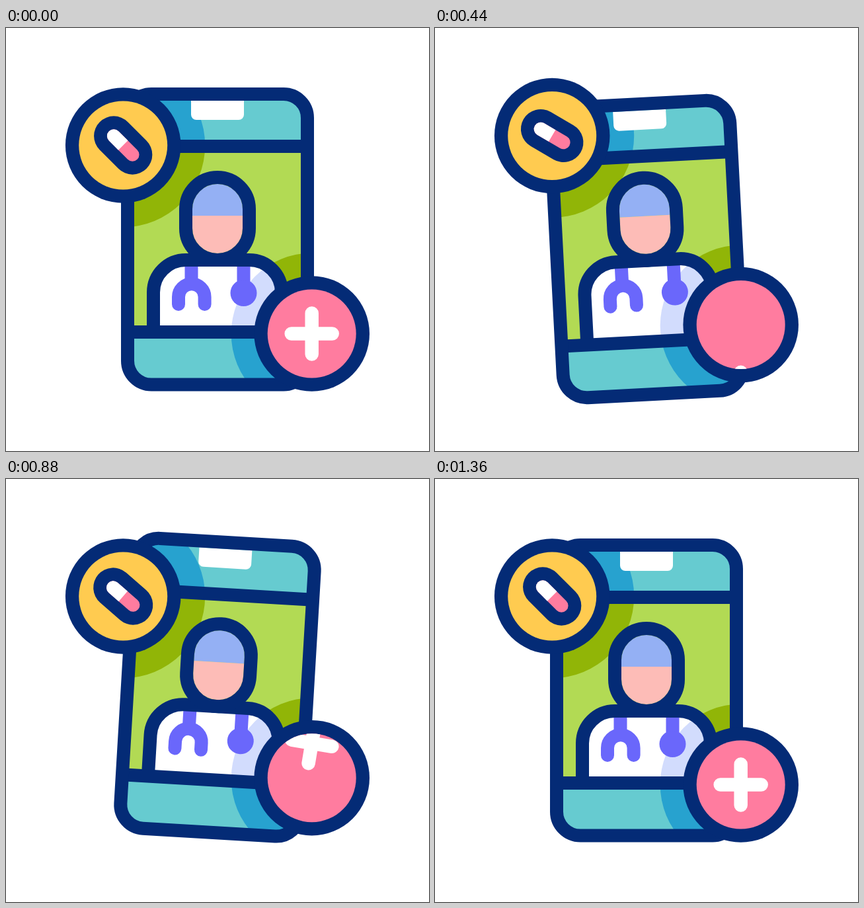
Write an HTML page with a canvas that moves like this. It is 640 px wide and 640 px high and loops after 1.68 s.

```html
<!DOCTYPE html>
<html lang="en">
<head>
<meta charset="utf-8">
<title>Online doctor</title>
<style>
  html, body { margin: 0; width: 100%; height: 100%; overflow: hidden; background: #fff; }
  canvas { display: block; width: 640px; height: 640px; }
</style>
</head>
<body>
<canvas id="stage" width="640" height="640"></canvas>
<script>
const ctx = document.getElementById('stage').getContext('2d');
const LOOP = 1680;
const NAVY = '#042b76', PINK = '#ff7c9f', WHITE = '#fff', VIOLET = '#6a67fb';
const TEAL = '#66cbd0', TEAL_SHADE = '#27a2cf';

const smooth = u => u * u * (3 - 2 * u);
const linear = u => u;

// Eased progress from 0 to 1 between two times in ms.
const ramp = (t, from, to, ease = smooth) =>
  ease(Math.min(1, Math.max(0, (t - from) / (to - from))));

// Swings from rest through each [time, value] turning point.
function swing(t, rest, ...turns) {
  let value = rest, from = 0;
  for (const [time, next] of turns) {
    value += (next - value) * ramp(t, from, time);
    if (t < time) break;
    from = time;
  }
  return value;
}

// Rises to a value, holds it, and falls back to zero.
const lift = (t, height, start, top, leave, end) =>
  height * (ramp(t, start, top) - ramp(t, leave, end));

// The cross drops out of its badge, then falls back in and settles.
const crossDrop = t => t < 560
  ? 120 * ramp(t, 190, 520)
  : -112 + 127 * ramp(t, 600, 1200, linear) - 15 * ramp(t, 1200, 1360);

const poseAt = t => ({
  phoneAngle: swing(t, 0, [278, 9], [550, -9.5], [760, 4.6], [1120, 0]),
  phoneY: swing(t, 0, [375, 20], [680, -23.5], [960, 0]),
  doctorY: swing(t, 0, [520, -15], [1000, 0]),
  pillY: lift(t, -14.5, 0, 420, 510, 820),
  pillAngle: swing(t, 45, [370, 23.5], [620, 58], [800, 39], [1000, 45]),
  plusY: lift(t, -28.3, 255, 640, 680, 1020),
  crossY: crossDrop(t),
  crossAngle: 90 * ramp(t, 760, 1360)
});

function shape(build) {
  const path = new Path2D();
  build(path);
  return path;
}
const box = (x, y, w, h, r = 0) => shape(p => p.roundRect(x, y, w, h, r));
const disc = (x, y, r) => shape(p => p.arc(x, y, r, 0, 7));

const frame = box(184, 100, 272, 439.5, 36);
const header = box(184, 100, 272, 79, [36, 36, 0, 0]);
const screen = box(184, 179, 272, 281);
const footer = box(184, 460, 272, 79.5, [0, 0, 36, 36]);
const dividers = new Path2D('M184 179H456M184 460H456');
const notch = box(280, 110, 80, 29, [0, 0, 8, 8]);
const head = box(272, 226, 96, 125, 48);
const hair = box(282, 236, 76, 48, [38, 38, 0, 0]);
const face = box(282, 284, 76, 57, [0, 0, 38, 38]);
const torso = new Path2D('M223 500V400a49 49 0 0 1 49-49H368a49 49 0 0 1 49 49V500');
const straps = new Path2D('M280.5 360V380M359.5 360V390');
const tubes = new Path2D('M261 418V407a19.8 19.8 0 0 1 39.6 0V418');
const chestpiece = disc(359.5, 401, 20);
const cross = new Path2D('M-31 0H31M0-31V31');
const pill = new Path2D('M-20 0H20');
const pillStart = box(-30.2, -10.2, 30.2, 20.4, [10.2, 0, 0, 10.2]);

function fill(path, color) {
  ctx.fillStyle = color;
  ctx.fill(path);
}

function stroke(path, color = NAVY, width = 20, cap = 'butt') {
  ctx.strokeStyle = color;
  ctx.lineWidth = width;
  ctx.lineCap = cap;
  ctx.stroke(path);
}

function layer(draw) {
  ctx.save();
  draw();
  ctx.restore();
}

const rotate = degrees => ctx.rotate(degrees * Math.PI / 180);

// The badges cast round shadows that stay upright while the phone tilts.
function fillShaded(path, color, shade, shadows) {
  fill(path, color);
  layer(() => {
    ctx.clip(path);
    ctx.resetTransform();
    shadows.forEach(s => fill(s, shade));
  });
}

function drawDoctor(shadows) {
  fillShaded(torso, WHITE, '#d2dcfd', shadows);
  stroke(straps, VIOLET);
  stroke(tubes, VIOLET, 20, 'round');
  fill(chestpiece, VIOLET);
  stroke(torso);
  fill(hair, '#94b0f4');
  fill(face, '#fdbcb7');
  stroke(head);
}

function drawPhone(pose, shadows) {
  ctx.translate(320, 320 + pose.phoneY);
  rotate(pose.phoneAngle);
  ctx.translate(-320, -320);
  fillShaded(header, TEAL, TEAL_SHADE, shadows);
  fillShaded(screen, '#b2da54', '#91b507', shadows);
  layer(() => {
    ctx.clip(screen);
    ctx.translate(0, pose.doctorY);
    drawDoctor(shadows);
  });
  fillShaded(footer, TEAL, TEAL_SHADE, shadows);
  fill(notch, WHITE);
  stroke(dividers);
  stroke(frame);
}

function drawBadge(x, y, color, drawIcon) {
  ctx.translate(x, y);
  fill(disc(0, 0, 87.3), NAVY);
  const plate = disc(0, 0, 67);
  fill(plate, color);
  ctx.clip(plate);
  drawIcon();
}

function render(t) {
  const pose = poseAt(t);
  const shadows = [
    disc(177.2, 177.5 + pose.pillY, 124),
    disc(462.7, 462.5 + pose.plusY * 0.9, 122)
  ];

  fill(box(0, 0, 640, 640), WHITE);
  layer(() => drawPhone(pose, shadows));
  layer(() => drawBadge(177.2, 177.5 + pose.pillY, '#ffcb50', () => {
    rotate(pose.pillAngle);
    stroke(pill, NAVY, 60, 'round');
    stroke(pill, PINK, 20.4, 'round');
    fill(pillStart, WHITE);
  }));
  layer(() => drawBadge(462.7, 462.5 + pose.plusY, PINK, () => {
    ctx.translate(0, pose.crossY);
    rotate(pose.crossAngle);
    stroke(cross, WHITE, 20.5, 'round');
  }));
}

const start = performance.now();
function tick() {
  render((performance.now() - start) % LOOP);
  requestAnimationFrame(tick);
}
tick();
</script>
</body>
</html>
```
